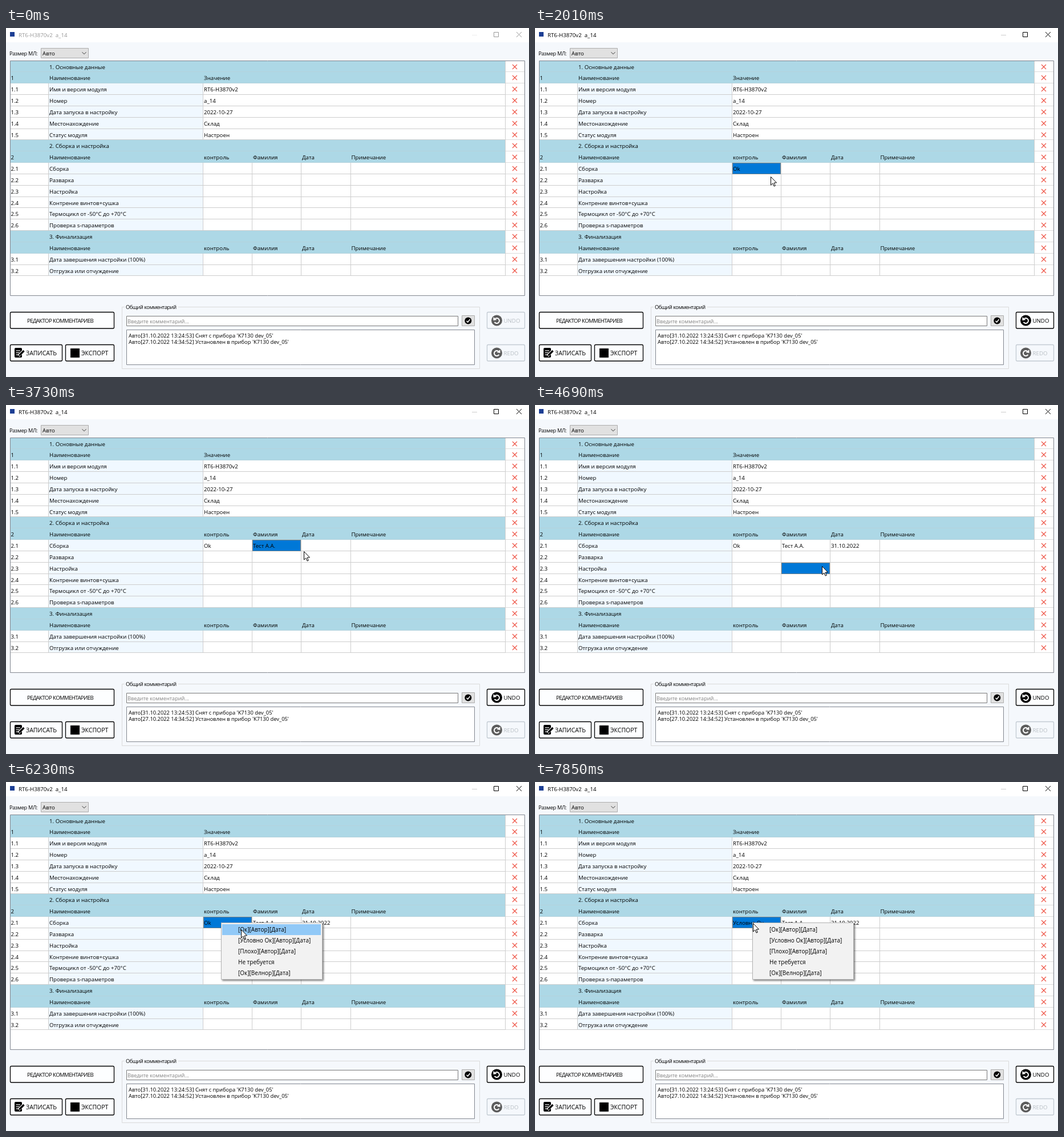
An HTML page with a canvas for the animation above (8000 ms loop, 917 by 611 pixels).

```html
<!DOCTYPE html>
<html lang="ru">
<head>
<meta charset="utf-8">
<title>Маршрутный лист</title>
<style>
  html, body { margin: 0; width: 100%; height: 100%; overflow: hidden; background: #f5f8fc; }
  canvas { display: block; }
</style>
</head>
<body>
<canvas id="stage" width="917" height="611"></canvas>
<script>
const ctx = document.getElementById('stage').getContext('2d');
const LOOP = 8000, TICK = 95.6;
const WINDOW = '#f5f8fc', BLUE = '#0078d7', GRID = '#cdcdcd', HEADER = '#add8e6';
const MODULE = 'RT6-H3870v2', DEVICE = "'K7130 dev_05'";

const columns = [8, 74.5, 345.5, 431.5, 517.5, 604, 875];
const fields = ['Наименование', 'контроль', 'Фамилия', 'Дата', 'Примечание'];
const rows = [
  ['', '1. Основные данные'],
  ['1', 'Наименование', 'Значение'],
  ['1.1', 'Имя и версия модуля', MODULE],
  ['1.2', 'Номер', 'a_14'],
  ['1.3', 'Дата запуска в настройку', '2022-10-27'],
  ['1.4', 'Местонахождение', 'Склад'],
  ['1.5', 'Статус модуля', 'Настроен'],
  ['', '2. Сборка и настройка'],
  ['2', ...fields],
  ['2.1', 'Сборка'],
  ['2.2', 'Разварка'],
  ['2.3', 'Настройка'],
  ['2.4', 'Контрение винтов+сушка'],
  ['2.5', 'Термоцикл от -50°C до +70°C'],
  ['2.6', 'Проверка s-параметров'],
  ['', '3. Финализация'],
  ['', ...fields],
  ['3.1', 'Дата завершения настройки (100%)'],
  ['3.2', 'Отгрузка или отчуждение'],
];
const headerRows = new Set([0, 1, 7, 8, 15, 16]);
const menuItems = ['[Ок][Автор][Дата]', '[Условно Ок][Автор][Дата]', '[Плохо][Автор][Дата]',
  'Не требуется', '[Ок][Велнор][Дата]'];

// Pointer path: time, x, y
const path = [
  [100, 868, 600], [870, 418, 254], [1240, 419, 247], [1530, 419, 247], [1720, 403, 261],
  [1910, 400, 262], [2390, 509, 248], [2580, 511, 247], [2960, 511, 247], [3350, 489, 265],
  [3560, 489, 264], [3920, 560, 248], [4300, 560, 248], [4590, 503, 282], [4700, 503, 282],
  [5070, 389, 249], [5470, 379, 247], [5660, 379, 247], [6230, 412, 258], [6600, 412, 258],
  [6710, 417, 275], [6900, 418, 277], [7080, 418, 277], [7380, 385, 248], [7660, 382, 247],
];

function pointerAt(t) {
  const next = path.findIndex(p => p[0] > t);
  if (next === 0) return null;
  if (next < 0) return path[path.length - 1].slice(1);
  const [t0, x0, y0] = path[next - 1], [t1, x1, y1] = path[next];
  const u = (t - t0) / (t1 - t0), k = u * u * (3 - 2 * u);
  return [x0 + (x1 - x0) * k, y0 + (y1 - y0) * k];
}

function text(s, x, y, size = 9.7, color = '#000', spacing = 0) {
  ctx.font = `${size}px "Open Sans", "Noto Sans", sans-serif`;
  ctx.letterSpacing = spacing + 'px';
  ctx.fillStyle = color;
  ctx.fillText(s, x, y);
}

function rect(x, y, w, h, fill, stroke, radius = 0, width = 1) {
  ctx.beginPath();
  ctx.roundRect(x + .5, y + .5, w - 1, h - 1, radius);
  if (fill) { ctx.fillStyle = fill; ctx.fill(); }
  if (stroke) { ctx.strokeStyle = stroke; ctx.lineWidth = width; ctx.stroke(); }
}

function fill(x, y, w, h, color) {
  ctx.fillStyle = color;
  ctx.fillRect(x, y, w, h);
}

function line(points, color, width = 1) {
  ctx.beginPath();
  points.forEach(([x, y]) => ctx.lineTo(x, y));
  ctx.strokeStyle = color;
  ctx.lineWidth = width;
  ctx.stroke();
}

function disc(x, y, r, color) {
  ctx.beginPath();
  ctx.arc(x, y, r, 0, 7);
  ctx.fillStyle = color;
  ctx.fill();
}

function cross(x, y, r, color, width) {
  line([[x - r, y - r], [x + r, y + r]], color, width);
  line([[x - r, y + r], [x + r, y - r]], color, width);
}

function chevron(x, y, r = 3.5) {
  line([[x - r, y - r / 2], [x, y + r / 2], [x + r, y - r / 2]], '#333');
}

const rowTop = i => Math.round(57.6 + 19.83 * i);
const cellBox = (row, col) => {
  const x = Math.ceil(columns[col]);
  return [x, rowTop(row), Math.floor(columns[col + 1]) - x, rowTop(row + 1) - rowTop(row)];
};

function titleBar(active) {
  const ink = active ? '#000' : '#999';
  fill(0, 0, 917, 25, '#fff');
  fill(7, 7, 8, 8, '#1c3f94');
  text(`${MODULE}  a_14`, 22, 15.5, 9.7, ink);
  line([[817, 12.5], [826, 12.5]], active ? '#ccc' : '#eee');
  rect(855, 7, 9, 9, null, ink);
  cross(899.5, 11.5, 4.5, ink, 1);
}

function table(cells) {
  rect(7, 57, 903, 412, '#fff', '#828790');
  rows.forEach((row, i) => {
    const top = rowTop(i), h = rowTop(i + 1) - top, isHeader = headerRows.has(i);
    if (isHeader) fill(8, top, 867, h, HEADER);
    else {
      fill(75, top, 270, h, '#f0f8ff');
      const splits = i < 7 ? [1, 2] : [1, 2, 3, 4, 5];
      splits.forEach(c => fill(Math.floor(columns[c]), top, 1, h, GRID));
    }
    fill(8, top + h - 1, 867, 1, isHeader ? '#b4d2dc' : GRID);
    fill(875, top + h - 1, 34, 1, '#dcdcdc');
    fill(875, top, 1, h, GRID);
    cross(892, top + 10, 4, '#ee5a4c', 1.2);
    const values = i === 9 ? [...row, ...cells] : row;
    values.forEach((s, c) => text(s, columns[c] + (c ? 1.5 : .5), top + 13.7));
  });
}

function selection(row, col, label = '') {
  const [x, y, w, h] = cellBox(row, col);
  fill(x, y, w, h, BLUE);
  ctx.setLineDash([1, 1]);
  rect(x, y, w, h, null, '#e08a3c');
  ctx.setLineDash([]);
  text(label, columns[col] + 1.5, y + 13.7);
}

function comboEditor(col, background, caret) {
  const [x, y, w, h] = cellBox(9, col);
  rect(x, y, w + 1, h, background, '#000');
  if (caret) fill(x + 4, y + 5, 1, 10, '#000');
  chevron(x + w - 8, y + 10);
}

function dropList(col, items, hovered) {
  const [x, y, w, h] = cellBox(9, col), top = y + h;
  rect(x, top, w + 1, items.length * 13 + 2, '#fff', '#555');
  items.forEach((s, i) => {
    if (i === hovered) fill(x + 1, top + 1 + i * 13, w - 1, 13, BLUE);
    text(s, x + 4, top + 11 + i * 13, 9.7, i === hovered ? '#fff' : '#000');
  });
}

function contextMenu(x, pointer) {
  const y = 246;
  ctx.save();
  ctx.shadowColor = 'rgba(0,0,0,.5)';
  ctx.shadowBlur = 3;
  ctx.shadowOffsetX = ctx.shadowOffsetY = 2;
  fill(x, y, 178, 100, '#f2f2f2');
  ctx.restore();
  rect(x, y, 178, 100, '#f2f2f2', '#b4b4b4');
  const hovered = pointer[0] > x + 6 ? Math.floor((pointer[1] - 249) / 19) : -1;
  menuItems.forEach((s, i) => {
    if (i === hovered) fill(x + 2, y + 3 + i * 19, 173, 19, '#91c9f7');
    text(s, x + 30, y + 16 + i * 19, 10);
  });
}

function turnArrow(x, y, color, mirror) {
  disc(x, y, 9.5, color);
  ctx.save();
  ctx.translate(x, y);
  ctx.scale(mirror, 1);
  ctx.beginPath();
  ctx.arc(0, .5, 4.5, -2.2, 2.6);
  ctx.strokeStyle = '#fff';
  ctx.lineWidth = 2;
  ctx.stroke();
  ctx.beginPath();
  ctx.moveTo(-6, -6);
  ctx.lineTo(-6, 0);
  ctx.lineTo(0, -1);
  ctx.fillStyle = '#fff';
  ctx.fill();
  ctx.restore();
}

function button(x, y, w, enabled = true) {
  rect(x, y, w, 29.5, enabled ? '#fdfeff' : WINDOW, enabled ? '#000' : '#c3cbd3', 2, 1.3);
}

function historyButton(label, y, enabled, mirror) {
  button(843, y, 67, enabled);
  turnArrow(860.5, y + 15, enabled ? '#000' : '#5c5c5c', mirror);
  text(label, 872.5, y + 18.7, 9.7, enabled ? '#000' : '#b8bec4');
}

function saveIcon() {
  rect(15, 560, 13, 17, '#000', '#000', 1);
  [565, 568.5, 572].forEach((y, i) => line([[17.5, y], [25 - i * 1.5, y]], '#fff', 1.2));
  line([[22, 574], [31, 565]], '#fff', 5);
  line([[23.5, 573], [31.5, 565]], '#000', 3.2);
  line([[21, 575.5], [23.5, 573]], '#000', 1.5);
}

function footer(undoEnabled) {
  button(7, 497, 183);
  text('РЕДАКТОР КОММЕНТАРИЕВ', 37, 515.7, 9.6, '#000', -.6);
  button(7, 554, 92);
  saveIcon();
  text('ЗАПИСАТЬ', 35, 573, 10.6);
  button(104, 554, 86);
  fill(113, 561, 16, 16, '#000');
  text('ЭКСПОРТ', 132, 573, 10.5);

  rect(203, 488, 628, 109, null, '#dadada');
  fill(208, 484, 94, 9, WINDOW);
  text('Общий комментарий', 210, 492, 9.2, '#000', -.45);
  rect(211, 504, 582, 18, '#fff', '#7a7a7a');
  text('Введите комментарий...', 213, 516.7, 9.2, '#808080');
  rect(799, 503, 23, 19, '#e1e1e1', '#adadad');
  disc(810.3, 512.5, 6, '#000');
  line([[807.5, 512.7], [809.7, 515], [813.5, 510]], '#fff', 1.5);
  rect(211, 528, 611, 62, '#fff', '#828790');
  text(`Авто[31.10.2022 13:24:53] Снят с прибора ${DEVICE}`, 215, 542, 9.35);
  text(`Авто[27.10.2022 14:34:52] Установлен в прибор ${DEVICE}`, 215, 553.3, 9.35);

  historyButton('UNDO', 497, undoEnabled, 1);
  historyButton('REDO', 554, false, -1);
}

function arrowPointer([x, y]) {
  const shape = [[0, 0], [0, 14.5], [3.3, 11.4], [5.7, 16.6], [7.8, 15.6], [5.5, 10.6], [10, 10.4]];
  ctx.beginPath();
  shape.forEach(([dx, dy]) => ctx.lineTo(Math.round(x) + .5 + dx, Math.round(y) + .5 + dy));
  ctx.closePath();
  ctx.fillStyle = '#fff';
  ctx.fill();
  ctx.strokeStyle = '#000';
  ctx.lineWidth = 1;
  ctx.stroke();
}

function draw(time) {
  const t = time < 100 ? 0 : 100 + Math.floor((time - 94) / TICK) * TICK;
  const between = (a, b) => t >= a && t < b;
  const pointer = pointerAt(t);
  const control = t < 1860 ? '' : t < 6760 ? 'Ok' : 'Условно Ок';
  const cells = [control, t < 3500 ? '' : 'Тест А.А.', t < 3960 ? '' : '31.10.2022', ''];

  fill(0, 0, 917, 611, WINDOW);
  titleBar(t >= 1290);
  text('Размер МЛ:', 6, 47.5, 9.2, '#000', -.3);
  rect(61, 35, 84, 18, '#e1e1e1', '#adadad');
  text('Авто', 64, 47.5);
  chevron(137, 44);
  table(cells);
  footer(t >= 1860);

  if (between(1290, 1390)) selection(9, 2);
  if (between(1390, 1860)) comboEditor(2, '#e1e1e1', false);
  if (between(1490, 1860)) dropList(2, ['Ok', 'Условно Ок', 'Плохо'], 0);
  if (between(1860, 2440)) selection(9, 2, control);
  if (between(2440, 2540)) selection(9, 3);
  if (between(2540, 3500)) comboEditor(3, '#fff', true);
  if (between(2920, 3500)) dropList(3, ['Тест А.А.'], t > 3150 ? 0 : -1);
  if (between(3500, 3870)) selection(9, 3, cells[1]);
  if (between(3870, 3960)) selection(9, 4);
  if (between(3960, 4550)) {
    const [x, y, w, h] = cellBox(9, 4);
    rect(x, y, w, h, '#fff', '#000');
    text(cells[2], 521, y + 13.7);
  }
  if (between(4550, 5630)) selection(11, 3);
  if (between(6760, 7700)) selection(10, 5);
  if (between(5630, 6760) || t >= 7700) selection(9, 2, control);
  if (between(5700, 6760)) contextMenu(377, pointer);
  if (t >= 7800) contextMenu(381, pointer);
  if (pointer) arrowPointer(pointer);
}

function frame(now) {
  draw(now % LOOP);
  requestAnimationFrame(frame);
}
requestAnimationFrame(frame);
</script>
</body>
</html>
```
